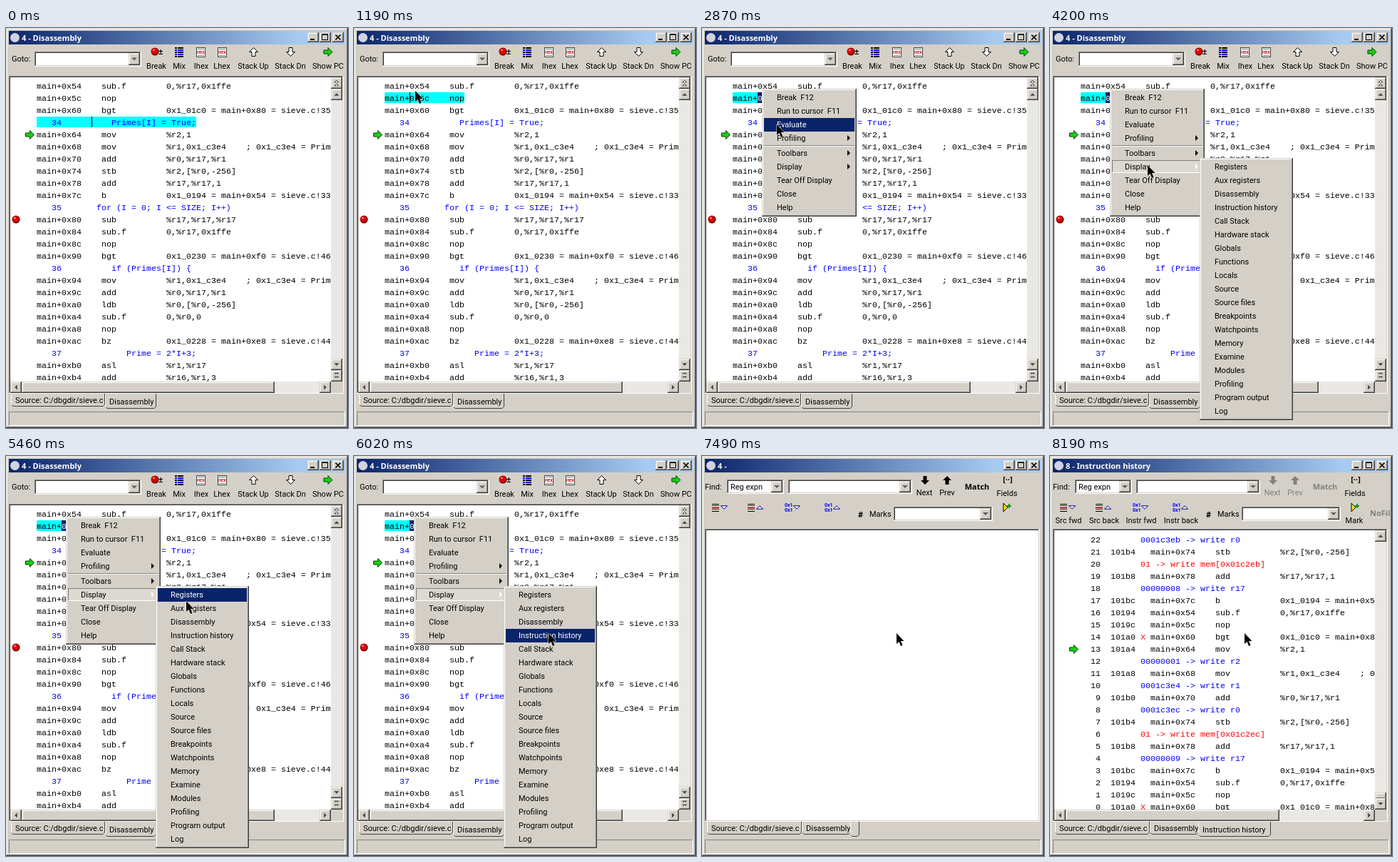
Animation of 480 by 560 pixels, one loop 9940 ms. Source, as an HTML page with a canvas:

```html
<!DOCTYPE html>
<html>
<head>
<meta charset="utf-8">
<style>
html, body { margin: 0; width: 100%; height: 100%; overflow: hidden; background: #d4d0c8; }
canvas { display: block; }
</style>
</head>
<body>
<canvas id="stage" width="480" height="560"></canvas>
<script>
const g = document.getElementById('stage').getContext('2d');
const LOOP = 9940, STEP = 70;
const FACE = '#d4d0c8', SHADE = '#808080', DARK = '#404040', NAVY = '#0a246a', CYAN = '#0ff', BLUE = '#00f';
const UI = '11px Roboto, sans-serif', BOLD = 'bold 11px "Noto Sans", sans-serif';
const CODE = '11.667px "Liberation Mono", monospace', CELL = 7, LEFT = 43, PITCH = 17;

// Instructions are "offset mnemonic operands"; source lines are [number, indent, text].
const listing = [
  '54 sub.f 0,%r17,0x1ffe', '5c nop', '60 bgt 0x1_01c0 = main+0x80 = sieve.c!35',
  [34, 15, 'Primes[I] = True;'],
  '64 mov %r2,1', '68 mov %r1,0x1_c3e4    ; 0x1_c3e4 = Primes', '70 add %r0,%r17,%r1',
  '74 stb %r2,[%r0,-256]', '78 add %r17,%r17,1', '7c b 0x1_0194 = main+0x54 = sieve.c!33',
  [35, 12, 'for (I = 0; I <= SIZE; I++)'],
  '80 sub %r17,%r17,%r17', '84 sub.f 0,%r17,0x1ffe', '8c nop', '90 bgt 0x1_0230 = main+0xf0 = sieve.c!46',
  [36, 15, 'if (Primes[I]) {'],
  '94 mov %r1,0x1_c3e4    ; 0x1_c3e4 = Primes', '9c add %r0,%r17,%r1', 'a0 ldb %r0,[%r0,-256]',
  'a4 sub.f 0,%r0,0', 'a8 nop', 'ac bz 0x1_0228 = main+0xe8 = sieve.c!44',
  [37, 18, 'Prime = 2*I+3;'],
  'b0 asl %r1,%r17', 'b4 add %r16,%r1,3'
];
// Executed offsets, or the value written, from entry 22 down to 0.
const history = ['0001c3eb r0', '74', '01 mem[0x01c2eb]', '78', '00000008 r17', '7c', '54', '5c', '60', '64',
  '00000001 r2', '68', '0001c3e4 r1', '70', '0001c3ec r0', '74', '01 mem[0x01c2ec]', '78', '00000009 r17',
  '7c', '54', '5c', '60'];
const menu = [['Break  F12', 97], ['Run to cursor  F11', 116], ['Evaluate', 135], ['Profiling', 154, 1],
  ['Toolbars', 175, 1], ['Display', 194, 1], ['Tear Off Display', 213], ['Close', 232], ['Help', 251]];
const submenu = ['Registers', 'Aux registers', 'Disassembly', 'Instruction history', 'Call Stack',
  'Hardware stack', 'Globals', 'Functions', 'Locals', 'Source', 'Source files', 'Breakpoints', 'Watchpoints',
  'Memory', 'Examine', 'Modules', 'Profiling', 'Program output', 'Log'].map((s, i) => [s, 194 + 19 * i]);

// Pointer keyframes: time, x, y
const path = [[70, 17, 84], [490, 73, 88], [560, 73, 88], [770, 79, 88], [980, 79, 88], [1190, 86, 88],
  [1470, 86, 88], [1540, 87, 88], [1750, 85, 86], [1820, 85, 86], [1890, 84, 84], [2170, 84, 84],
  [2240, 85, 86], [2520, 85, 86], [2870, 105, 135], [3220, 131, 192], [3360, 131, 192], [3430, 132, 192],
  [4130, 132, 192], [4200, 137, 192], [4760, 235, 197], [5180, 151, 199], [5460, 253, 203],
  [6020, 273, 248], [LOOP, 273, 248]];

function pointerAt(t) {
  const i = path.findIndex(k => k[0] > t), a = path[i - 1], b = path[i];
  const f = (t - a[0]) / (b[0] - a[0]);
  return [1, 2].map(n => Math.round(a[n] + (b[n] - a[n]) * f));
}

function rect(c, x, y, w, h) { g.fillStyle = c; g.fillRect(x, y, w, h); }

function text(s, x, y, c = '#000', font = UI, align = 'left') {
  g.font = font;
  g.fillStyle = c;
  g.textAlign = align;
  g.fillText(s, x, y);
}

function label(s, cx, mid, c) { text(s, cx, mid + 3, c, UI, 'center'); }

function edge(x, y, w, h, tl, br) {
  rect(tl, x, y, w, 1);
  rect(tl, x, y, 1, h);
  rect(br, x, y + h - 1, w, 1);
  rect(br, x + w - 1, y, 1, h);
}

function raised(x, y, w, h) {
  rect(FACE, x, y, w, h);
  edge(x, y, w, h, FACE, DARK);
  edge(x + 1, y + 1, w - 2, h - 2, '#fff', SHADE);
}

function sunken(x, y, w, h, fill) {
  rect(fill, x, y, w, h);
  edge(x, y, w, h, SHADE, '#fff');
}

function well(x, y, w, h) {
  sunken(x, y, w, h, '#fff');
  edge(x + 1, y + 1, w - 2, h - 2, DARK, FACE);
}

function poly(pts, fill, stroke) {
  g.beginPath();
  for (let i = 0; i < pts.length; i += 2) g.lineTo(pts[i], pts[i + 1]);
  g.closePath();
  g.fillStyle = fill;
  g.fill();
  if (!stroke) return;
  g.strokeStyle = stroke;
  g.lineWidth = 1;
  g.stroke();
}

// Shapes point right; turn counts clockwise quarter turns.
function turned(cx, cy, turn, pts, fill, stroke) {
  g.save();
  g.translate(cx, cy);
  g.rotate(turn * Math.PI / 2);
  poly(pts, fill, stroke);
  g.restore();
}

function tri(cx, cy, turn, s = 4, fill = '#000', stroke) {
  turned(cx, cy, turn, [-s / 2, -s, s / 2, 0, -s / 2, s], fill, stroke);
}

function arrow(cx, cy, turn, fill, stroke) {
  turned(cx, cy, turn, [-6, -2.5, 0, -2.5, 0, -6, 6, 0, 0, 6, 0, 2.5, -6, 2.5], fill, stroke);
}

function dot(cx, cy, r, c) {
  g.beginPath();
  g.arc(cx, cy, r, 0, 7);
  g.fillStyle = c;
  g.fill();
}

function redDot(cx, cy) {
  dot(cx, cy, 5.5, '#600000');
  dot(cx - .5, cy - .5, 4.5, '#e00000');
  dot(cx - 1.5, cy - 2, 1.3, '#ff9c9c');
}

function combo(x, y, w, h) {
  well(x, y, w, h);
  raised(x + w - 18, y + 2, 16, h - 4);
  tri(x + w - 10, y + h / 2, 1, 4, '#606060');
}

function scrollButton(x, y, turn, double) {
  raised(x, y, 16, 16);
  if (!double) return tri(x + 8, y + 8, turn, 3.5, DARK);
  for (const d of [-2.5, 2.5]) {
    tri(x + 8, y + 8 + d, turn, 3.5, DARK);
    rect(FACE, x + 7, y + 7.5 + d, 2, 2);
  }
}

function scrollbars(top, thumbW, old) {
  rect('#eae8e4', 456, top, 16, 495 - top);
  rect('#eae8e4', 6, 495, 450, 16);
  rect(FACE, 456, 495, 16, 16);
  scrollButton(6, 495, 2);
  scrollButton(440, 495, 0);
  raised(22, 495, thumbW, 16);
  if (old) {
    scrollButton(456, top, 3, true);
    scrollButton(456, top + 16, 3);
    scrollButton(456, 463, 1);
    scrollButton(456, 479, 1, true);
  } else {
    scrollButton(456, top, 3);
    raised(456, 471, 16, 9);
    scrollButton(456, 479, 1);
  }
}

function tab(x, w, s, selected) {
  const h = selected ? 20 : 17, y = 512 + h;
  rect(FACE, x, 512, w, h);
  rect('#fff', x, 513, 1, h - 2);
  g.beginPath();
  g.moveTo(x + 1, y - 1.5);
  g.lineTo(x + 3, y + .5);
  g.lineTo(x + w - 3, y + .5);
  g.lineTo(x + w - .5, y - 2);
  g.lineTo(x + w - .5, 512);
  g.strokeStyle = DARK;
  g.lineWidth = 1;
  g.stroke();
  text(s, x + 6, selected ? 527 : 525);
}

function windowFrame(title) {
  rect(FACE, 0, 0, 480, 560);
  edge(0, 0, 480, 560, FACE, DARK);
  edge(1, 1, 478, 558, '#fff', SHADE);
  const grad = g.createLinearGradient(4, 0, 410, 0);
  grad.addColorStop(0, NAVY);
  grad.addColorStop(1, '#a6caf0');
  rect(grad, 4, 4, 472, 19);
  dot(12.5, 13.5, 6.5, '#d0d4e0');
  text(title, 22, 18, '#fff', BOLD);
  for (const x of [423, 440, 458]) raised(x, 6, 16, 14);
  rect('#000', 427, 15, 6, 2);
  edge(443, 8, 9, 9, '#000', '#000');
  rect('#000', 443, 9, 9, 1);
  g.beginPath();
  for (const s of [-1, 1]) {
    g.moveTo(462.5, 13 - 3.5 * s);
    g.lineTo(469.5, 13 + 3.5 * s);
  }
  g.strokeStyle = '#000';
  g.lineWidth = 1.6;
  g.stroke();
  sunken(4, 537, 472, 20, FACE);
}

function disassemblyTools() {
  text('Goto:', 8, 47);
  combo(40, 33, 150, 21);
  [['Break', 211], ['Mix', 243], ['Ihex', 274], ['Lhex', 303], ['Stack Up', 347], ['Stack Dn', 399],
    ['Show PC', 452]].forEach(([s, x]) => label(s, x, 54));
  redDot(209, 33);
  text('±', 214, 37, '#000', BOLD);
  for (let i = 0; i < 5; i++) {
    rect(i % 2 ? BLUE : '#000', 237, 27 + 3 * i, 3, 2);
    rect(i % 2 ? BLUE : '#000', 241, 27 + 3 * i, 8, 2);
  }
  for (const x of [267, 297]) {
    rect('#fff', x, 27, 13, 14);
    edge(x, 27, 13, 14, DARK, DARK);
    text('HEX', x + 6.5, 36, '#d00000', 'bold 5.5px Roboto, sans-serif', 'center');
    rect(SHADE, x + 2, 29, 9, 1);
    rect(SHADE, x + 2, 38, 9, 1);
  }
  arrow(347.5, 33.5, 3, '#fff', '#000');
  arrow(399.5, 33.5, 1, '#fff', '#000');
  arrow(452, 33.5, 0, '#18d018', '#004000');
}

function historyTools(t) {
  const off = t >= 8190 ? SHADE : '#000';
  text('Find:', 4, 47);
  combo(35, 33, 80, 20);
  text('Reg expn', 40, 47);
  combo(121, 33, 174, 20);
  arrow(313, 34, 1, off);
  arrow(344, 34, 3, off);
  label('Next', 312, 52, off);
  label('Prev', 344, 52, off);
  text('Match', 386, 47, off, BOLD, 'center');
  text('[··]', 429, 37, '#000', BOLD, 'center');
  label('Fields', 428, 53);
  [26, 76, 128, 184].forEach((x, i) => {
    if (i < 2) for (let n = 0; n < 5; n++) rect(n % 2 ? '#c00000' : '#000', x - 12, 67 + 2.5 * n | 0, 10, 1);
    else for (const y of [71, 78]) text('0x1', x - 12, y, BLUE, 'bold 7px Roboto, sans-serif');
    tri(x + 5, 72, i % 2 ? 3 : 1, 4.5, '#fff', '#000080');
  });
  text('#', 219, 86, '#000', BOLD);
  text('Marks', 235, 85);
  combo(269, 71, 139, 20);
  tri(426, 72, 0, 6, '#ffe000', '#000');
  rect('#00a000', 428, 69, 6, 2);
  rect('#00a000', 430, 67, 2, 6);
  if (t < 7910) return;
  [['Src fwd', 26], ['Src back', 76], ['Instr fwd', 128], ['Instr back', 184], ['Mark', 427]]
    .forEach(([s, x]) => label(s, x, 91));
  clipped(440, 60, 37, 40, () => text('NoFilter', 449, 84, SHADE, BOLD));
}

function clipped(x, y, w, h, draw) {
  g.save();
  g.beginPath();
  g.rect(x, y, w, h);
  g.clip();
  draw();
  g.restore();
}

function code(s, col, y, c) { text(s, LEFT + col * CELL, y, c, CODE); }

function instruction(line, col, y) {
  const [off, op, ...rest] = line.split(' ');
  code('main+0x' + off, col, y);
  code(op, col + 13, y);
  code(rest.join(' '), col + 26, y);
}

function disassembly(t) {
  well(4, 67, 470, 445);
  scrollbars(69, 355, true);
  clipped(6, 69, 450, 426, () => {
    if (t < 980) rect(CYAN, LEFT, 124, 32 * CELL, 15);
    else rect(CYAN, LEFT, 90, 16 * CELL, 15);
    listing.forEach((line, i) => {
      const y = 85 + PITCH * i;
      if (typeof line === 'string') return instruction(line, 0, y);
      code(line[0], 3, y, BLUE);
      code(line[2], line[1], y, BLUE);
    });
    if (t < 980) rect('#000', 120, 124, 1, 15);
    else if (t < 1610) rect('#000', 78, 90, 1, 15);
    else {
      rect(NAVY, 78, 90, CELL, 15);
      code('0', 5, 102, '#fff');
    }
    arrow(33.5, 149.5, 0, '#18d018', '#004000');
    redDot(14, 268);
  });
}

function historyList(t) {
  well(4, 102, 470, 410);
  if (t >= 7910) scrollbars(104, 300);
  if (t < 8190) return;
  clipped(6, 104, 450, 391, () => {
    history.forEach((entry, i) => {
      const y = 121 + PITCH * i, [key, place] = entry.split(' ');
      code(String(22 - i).padStart(2), 2, y);
      if (place) return code(key + ' -> write ' + place, 12, y, place[0] === 'm' ? '#f00' : BLUE);
      code((0x10140 + parseInt(key, 16)).toString(16), 6, y);
      if (key === '60') code('X', 12, y, '#f00');
      instruction(listing.find(l => typeof l === 'string' && l.startsWith(key)), 14, y);
    });
    arrow(33.5, 270.5, 0, '#18d018', '#004000');
  });
}

function menuItem([s, mid, nested], x, w, hot) {
  if (hot && !nested) rect(NAVY, x + 3, mid - 9, w - 6, 19);
  if (hot && nested) sunken(x + 3, mid - 9, w - 6, 18, '#dcd9d2');
  text(s, x + 21, mid + 4, hot && !nested ? '#fff' : '#000');
  if (nested) tri(x + 122, mid, 0, 4, hot ? '#fff' : '#000');
}

function menus(t, px, py) {
  if (t < 1890 || t >= 6650) return;
  const open = t >= 3360, over = mid => Math.abs(py - mid) <= 9.5;
  raised(84, 85, 133, 179);
  rect(SHADE, 87, 164, 127, 1);
  rect('#fff', 87, 165, 127, 1);
  menu.forEach(m => menuItem(m, 84, 133, open ? m[0] === 'Display' : t >= 2590 && over(m[1])));
  if (!open || t >= 6580) return;
  raised(210, 182, 131, 367);
  submenu.forEach(m => menuItem(m, 210, 131, px >= 213 && over(m[1])));
}

function pointer(x, y) {
  const shape = [0, 0, 0, 15, 3.5, 12, 6, 18, 8.5, 17, 6, 11, 10.5, 11];
  g.save();
  g.translate(x, y);
  poly(shape, '#fff', '#fff');
  poly(shape, '#000');
  g.restore();
}

function draw(t) {
  const named = t >= 7770;
  windowFrame(named ? '8 - Instruction history' : t < 7350 ? '4 - Disassembly' : '4 - ');
  if (t < 7490) {
    disassemblyTools();
    disassembly(t);
  } else {
    historyTools(t);
    historyList(t);
  }
  if (t < 7350) {
    tab(7, 132, 'Source: C:/dbgdir/sieve.c');
    tab(139, 72, 'Disassembly', true);
  } else {
    tab(7, 133, 'Source: C:/dbgdir/sieve.c');
    tab(140, 69, 'Disassembly');
    tab(208, named ? 102 : 13, named ? 'Instruction history' : '', true);
  }
  if (t < 70) return;
  const [x, y] = pointerAt(t);
  menus(t, x, y);
  pointer(x, y);
}

const start = performance.now();
function tick() {
  const t = (performance.now() - start) % LOOP;
  draw(Math.floor(t / STEP) * STEP);
  requestAnimationFrame(tick);
}
tick();
</script>
</body>
</html>
```
